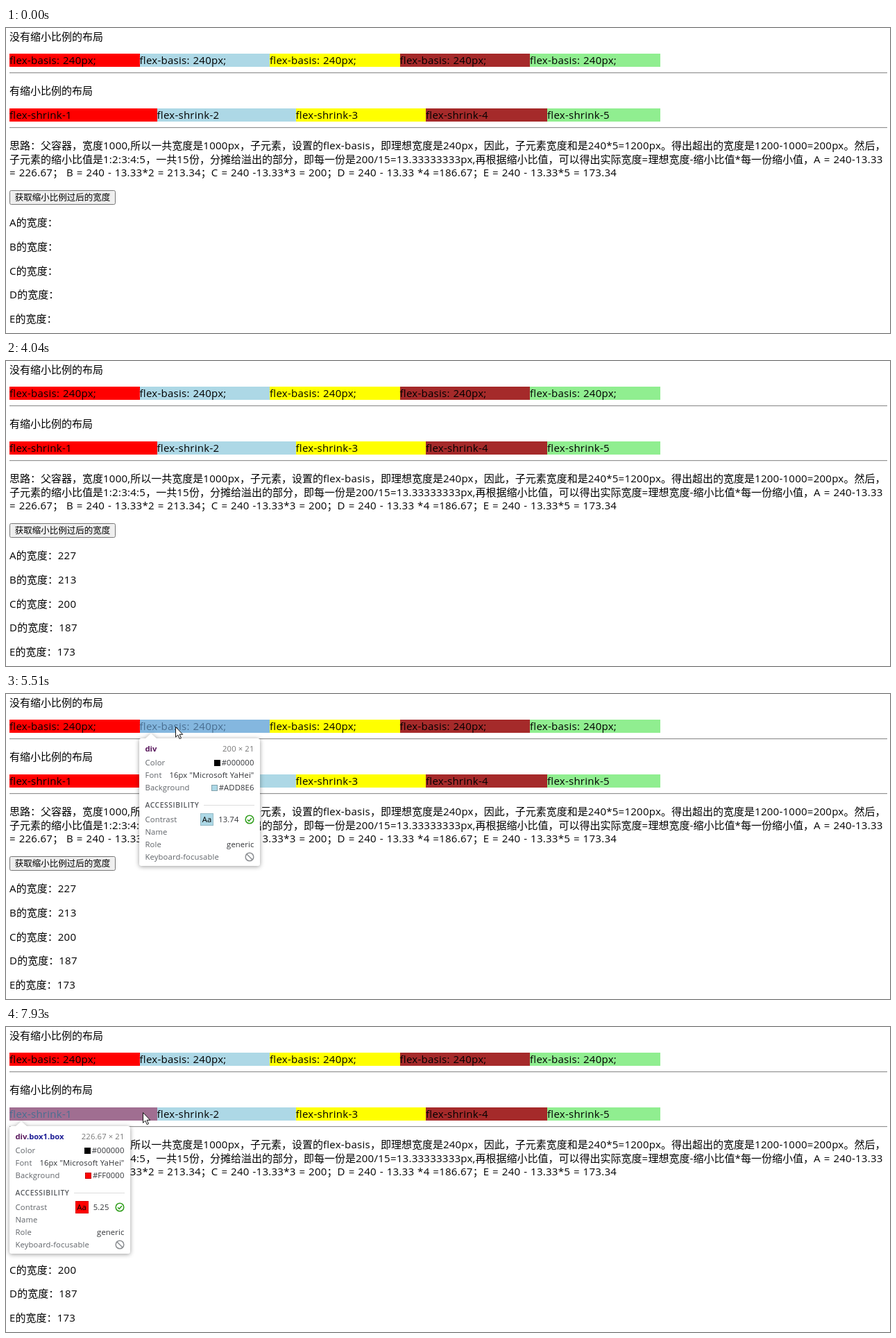
An HTML page for the animation above (8000 ms loop, 1274 px wide and 440 px high).

```html
<!DOCTYPE html>
<html lang="zh-CN">
<head>
<meta charset="utf-8">
<title>flex-shrink</title>
<style>
html, body { margin: 0; width: 100%; height: 100%; overflow: hidden; background: #fff; }
#stage {
  position: relative; width: 1274px; height: 440px; overflow: hidden; color: #000;
  font: 15px/19.7px "Open Sans", "Noto Sans CJK SC", "Noto Sans CJK", sans-serif;
  text-spacing-trim: space-all;
}
#stage > * { position: absolute; }
.text { left: 5px; white-space: pre; }
.en { letter-spacing: .26px; word-spacing: .7px; }
.cell { height: 19.7px; white-space: pre; }
.rule { left: 5px; width: 1265px; height: 1px; background: #929292; border-bottom: 1px solid #ececec; }
#button {
  left: 5px; top: 234px; width: 153px; height: 21px; box-sizing: border-box;
  border: 1px solid #767676; border-radius: 2.5px; background: #efefef;
  font-size: 12.5px; line-height: 19px; text-align: center; white-space: nowrap;
}
#button.hover { background: #e5e5e5; border-color: #4f4f4f; }
#button.press { background: #f5f5f5; border-color: #8d8d8d; }
#mark { box-sizing: border-box; background: rgba(111,168,220,.66); }
#mark::before, #mark::after {
  content: ""; position: absolute; left: 0; right: 0; height: var(--m);
  background: rgba(246,178,107,.66);
}
#mark::before { bottom: 100%; }
#mark::after { top: 100%; }
#tip {
  width: 174px; height: 184px; box-sizing: border-box; padding: 5.5px 8.5px 0;
  background: #fff; border-radius: 3px; filter: drop-shadow(0 1px 3px rgba(0,0,0,.4));
  font-size: 11.25px; line-height: 18px; letter-spacing: .13px; color: #5f6368; white-space: nowrap;
}
#tip::before {
  content: ""; position: absolute; left: 9px; top: -7px;
  border: solid transparent; border-width: 0 8.5px 7.5px; border-bottom-color: #fff;
}
.row { display: flex; justify-content: space-between; height: 18px; }
.row span { display: flex; align-items: center; color: #303236; }
.row.name { margin-bottom: 2.5px; }
.row.name span { color: #777; }
.row b { color: #5a1a5e; letter-spacing: 0; }
.row b i { font-style: normal; color: #1f1f96; }
.head { display: flex; align-items: center; height: 18px; margin: 7px 0 2.5px;
  font-size: 10.3px; font-weight: 600; letter-spacing: .6px; color: #55585c; }
.head::after { content: ""; flex: 1; height: 1px; margin-left: 6px; background: #ddd; }
.swatch { width: 9px; height: 9px; box-sizing: border-box; margin-right: 2px; border: 1px solid rgba(0,0,0,.25); }
.chip { width: 19px; height: 18px; box-sizing: border-box; margin-right: 7px;
  border: 1px solid rgba(0,0,0,.13); line-height: 16px; text-align: center; color: #000; }
.row svg { width: 14px; height: 14px; margin-left: 8px; fill: none; stroke-width: 1.5; }
#cursor { width: 13px; height: 20px; overflow: visible; }
</style>
</head>
<body>
<div id="stage"></div>
<script>
const stage = document.getElementById('stage');
const LOOP = 8000;

// Latin runs get their own spacing
const latin = s => s.replace(/[ -~]+/g, run => `<span class="en">${run}</span>`);

function add(cls, css, html = '') {
  const el = document.createElement('div');
  el.className = cls;
  el.style.cssText = css;
  el.innerHTML = html;
  stage.append(el);
  return el;
}
const text = (top, s) => add('text', `top:${top}px`, latin(s));

const colors = ['red', 'lightblue', 'yellow', 'brown', 'lightgreen'];
function bar(top, edges, label) {
  colors.forEach((color, i) => add('cell',
    `left:${edges[i]}px;top:${top}px;width:${edges[i + 1] - edges[i]}px;background:${color}`,
    latin(label(i))));
}

text(3, '没有缩小比例的布局');
bar(36.7, [5, 192.5, 380, 567.5, 755, 942.5], () => 'flex-basis: 240px;');
add('rule', 'top:64px');
text(81, '有缩小比例的布局');
bar(115.6, [5, 217.5, 417.5, 605, 780, 942.5], i => 'flex-shrink-' + (i + 1));
add('rule', 'top:142.6px');
[
  '思路：父容器，宽度1000,所以一共宽度是1000px，子元素，设置的flex-basis，即理想宽度是240px，因此，子元素宽度和是240*5=1200px。得出超出的宽度是1200-1000=200px。然后，',
  '子元素的缩小比值是1:2:3:4:5，一共15份，分摊给溢出的部分，即每一份是200/15=13.33333333px,再根据缩小比值，可以得出实际宽度=理想宽度-缩小比值*每一份缩小值，A = 240-13.33',
  '= 226.67； B = 240 - 13.33*2 = 213.34；C = 240 -13.33*3 = 200；D = 240 - 13.33 *4 =186.67；E = 240 - 13.33*5 = 173.34'
].forEach((line, i) => text(160 + i * 19.7, line));

const button = add('', '', '获取缩小比例过后的宽度');
button.id = 'button';

const values = [...'ABCDE'].map((letter, i) => {
  const row = text(271.2 + i * 34.69, letter + '的宽度：');
  const value = document.createElement('span');
  value.className = 'en';
  value.textContent = Math.round(240 - (i + 1) * 200 / 15);
  row.append(value);
  return value;
});

const mark = add('', '');
mark.id = 'mark';
const tip = add('', '');
tip.id = 'tip';
stage.insertAdjacentHTML('beforeend', `<svg id="cursor" viewBox="0 0 13 20">
  <path d="M.5 .5V15.2L3.8 12.1L6.2 17.6L8.5 16.6L6.1 11.3H10.7Z" fill="#fff" stroke="#111"/></svg>`);
const cursor = document.getElementById('cursor');

// Inspectable nodes: content box, vertical margin, tooltip facts
const p = (top, height, size) => ({
  box: [5, top, 1265, height], margin: 15, tag: 'p', size,
  prop: ['Margin', '16px 0px'], bg: '#fff', contrast: 21, role: 'paragraph'
});
const div = (box, cls, size, bg, contrast) => ({
  box, margin: 0, tag: 'div', cls, size,
  prop: ['Background', swatch(bg) + bg], bg, contrast, role: 'generic'
});
function swatch(color) { return `<i class="swatch" style="background:${color}"></i>`; }

const nodes = {
  html: { box: [0, 0, 1274, 440], margin: 0 },
  body: { box: [5, 3, 1265, 427], margin: 5 },
  title: p(81, 19.7, '1350 × 21'),
  para: p(160, 59, '1350 × 63'),
  cell: div([192.5, 36.7, 187.5, 19.7], '', '200 × 21', '#ADD8E6', '13.74'),
  box1: div([5, 115.6, 212.5, 19.7], '.box1.box', '226.67 × 21', '#FF0000', '5.25')
};

const row = (label, value = '', cls = '') => `<div class="row ${cls}">${label}<span>${value}</span></div>`;
const icon = (color, d) => `<svg viewBox="0 0 14 14" stroke="${color}"><circle cx="7" cy="7" r="5.8"/><path d="${d}"/></svg>`;
const tipHtml = n =>
  row(`<b>${n.tag}<i>${n.cls || ''}</i></b>`, n.size, 'name') +
  row('Color', swatch('#000') + '#000000') +
  row('Font', '16px "Microsoft YaHei"') +
  row(...n.prop) +
  '<div class="head">ACCESSIBILITY</div>' +
  row('Contrast', `<i class="chip" style="font-style:normal;background:${n.bg}">Aa</i>` +
    n.contrast + icon('#2f9e1b', 'M4 7.2L6.2 9.3L10 5')) +
  row('Name') +
  row('Role', n.role) +
  row('Keyboard-focusable', icon('#8a8d91', 'M3 3L11 11'));

// Pointer steps: [time, x, y, inspected node]
const steps = [[0]];
function move(t0, t1, n, from, to, ease = k => k) {
  for (let i = 0; i < n; i++) {
    const k = i / (n - 1), e = ease(k);
    steps.push([t0 + (t1 - t0) * k, from[0] + (to[0] - from[0]) * e, from[1] + (to[1] - from[1]) * e]);
  }
}
const easeOut = k => 1 - (1 - k) ** 1.6;
move(370, 670, 5, [1124, 428], [803, 346], easeOut);
move(840, 1610, 11, [780, 343], [139, 248], easeOut);
move(1700, 1780, 2, [130, 244], [123, 241]);
move(3660, 3960, 5, [126, 252], [158, 414]);
steps.push(
  [4040],
  [4970, null, null, 'html'],
  [5050, 300, 430, 'html'],
  [5120, 292, 365, 'body'],
  [5200, 283, 300, 'body'],
  [5280, 274, 236, 'body'],
  [5350, 265, 178, 'para'],
  [5430, 255, 94, 'title'],
  [5510, 244, 47, 'cell'],
  [5590, 232, 52, 'cell'],
  [5680, 216, 66, 'body'],
  [5760, 203, 81, 'title'],
  [5830, 195, 86, 'title'],
  [5910, 183, 97, 'title'],
  [5980, 174, 107, 'body'],
  [6060, 167, 117, 'box1'],
  [6140, 163, 121, 'box1'],
  [6220, 160, 123, 'box1'],
  [7770, 172, 123, 'box1'],
  [7850, 186, 123, 'box1'],
  [7930, 197, 123, 'box1']
);

const show = (el, on) => { el.style.visibility = on ? 'visible' : 'hidden'; };
const within = (t, a, b) => t >= a && t < b;

let shown;
function inspect(name) {
  if (name === shown) return;
  shown = name;
  const n = nodes[name];
  show(mark, n);
  show(tip, n && n.tag);
  if (!n) return;
  const [x, y, w, h] = n.box;
  mark.style.cssText += `;left:${x}px;top:${y}px;width:${w}px;height:${h}px;--m:${n.margin}px`;
  if (!n.tag) return;
  tip.style.left = Math.floor(x) + 'px';
  tip.style.top = Math.round(y + h + n.margin + 7.6) + 'px';
  tip.innerHTML = tipHtml(n);
}

const start = performance.now();
function draw() {
  const t = (performance.now() - start) % LOOP;
  const [, x, y, name] = steps.findLast(s => s[0] <= t);
  show(cursor, x != null);
  if (x != null) cursor.style.transform = `translate(${Math.round(x)}px,${Math.round(y)}px)`;
  const hover = !name && within(x, 5, 158) && within(y, 234, 255);
  const press = within(t, 2330, 2410) || within(t, 3410, 3490);
  button.className = press ? 'press' : hover ? 'hover' : '';
  values.forEach(v => show(v, t >= 2410));
  inspect(name);
  requestAnimationFrame(draw);
}
cursor.style.left = cursor.style.top = 0;
show(mark, false);
show(tip, false);
draw();
</script>
</body>
</html>
```
